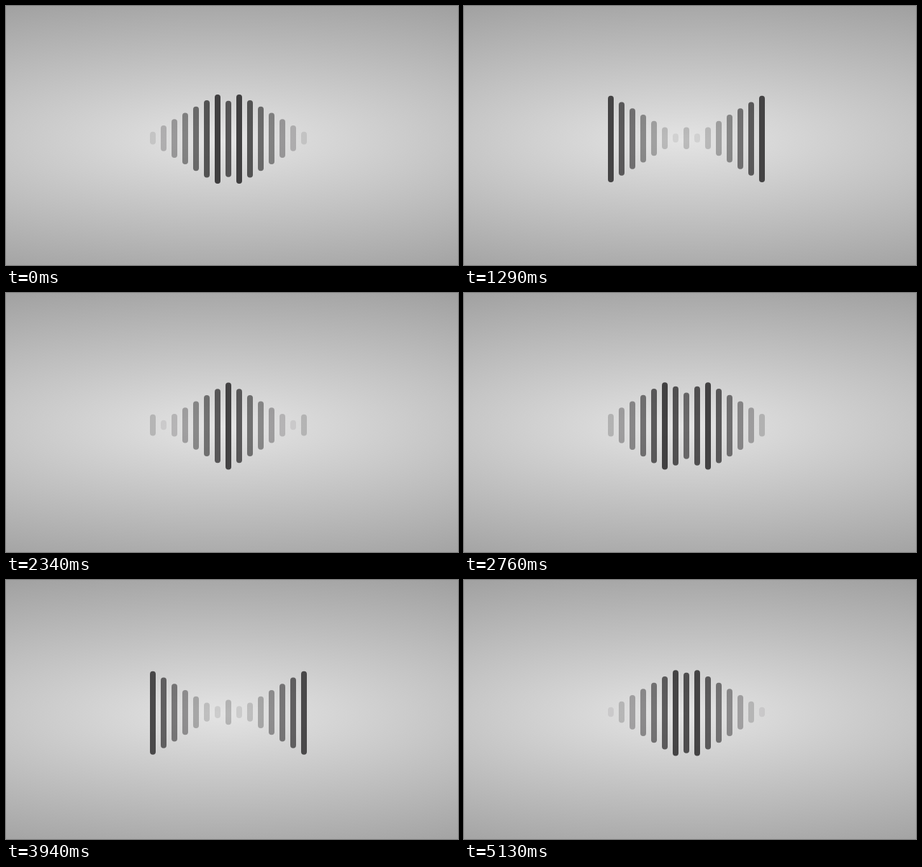
Recreate the animation shown at these times as an HTML page with a canvas. Size 628 by 360 pixels, loop 5200 ms.

```html
<!DOCTYPE html>
<html lang="en">
<head>
<meta charset="utf-8">
<title>Pulse bars</title>
<style>
  html, body { margin: 0; width: 100%; height: 100%; overflow: hidden; }
  body { background: radial-gradient(ellipse 744px 222px at 302px 186px, #e4e4e4, #9c9c9c); }
  canvas { display: block; }
</style>
</head>
<body>
<canvas id="stage" width="628" height="360"></canvas>
<script>
const ctx = document.getElementById('stage').getContext('2d');
const LOOP = 5200, HALF = 1300;   // one rise or fall lasts HALF
const BARS = 15, MID = 7, LAG = 208, PHASE = 61;

// The motion advances in holds of about 70 ms between these times.
const marks = [0, 70, 600, 1150, 3390, 3940, LOOP];

function hold(t) {
  const i = marks.findIndex(m => m > t) - 1;
  const span = marks[i + 1] - marks[i];
  const step = span / Math.round(span / 70);
  return marks[i] + Math.floor((t - marks[i]) / step) * step;
}

const lerp = (a, b, p) => a + (b - a) * p;

// Triangle wave, 0 to 1 to 0
function wave(t) {
  const p = t / HALF % 2;
  return p < 1 ? p : 2 - p;
}

function draw(now) {
  const t = hold(now % LOOP);
  ctx.clearRect(0, 0, 628, 360);
  ctx.fillStyle = '#3e3d3e';
  for (let i = 0; i < BARS; i++) {
    const p = wave(t + PHASE + (MID - Math.abs(i - MID)) * LAG);
    const top = lerp(177.2, 122.6, p), bottom = lerp(189.8, 247.3, p);
    ctx.globalAlpha = lerp(0.1, 1, p);
    ctx.beginPath();
    ctx.roundRect(200 + i * 15, top, 8, bottom - top, 4);
    ctx.fill();
  }
}

function tick() {
  draw(performance.now());
  requestAnimationFrame(tick);
}
tick();
</script>
</body>
</html>
```
